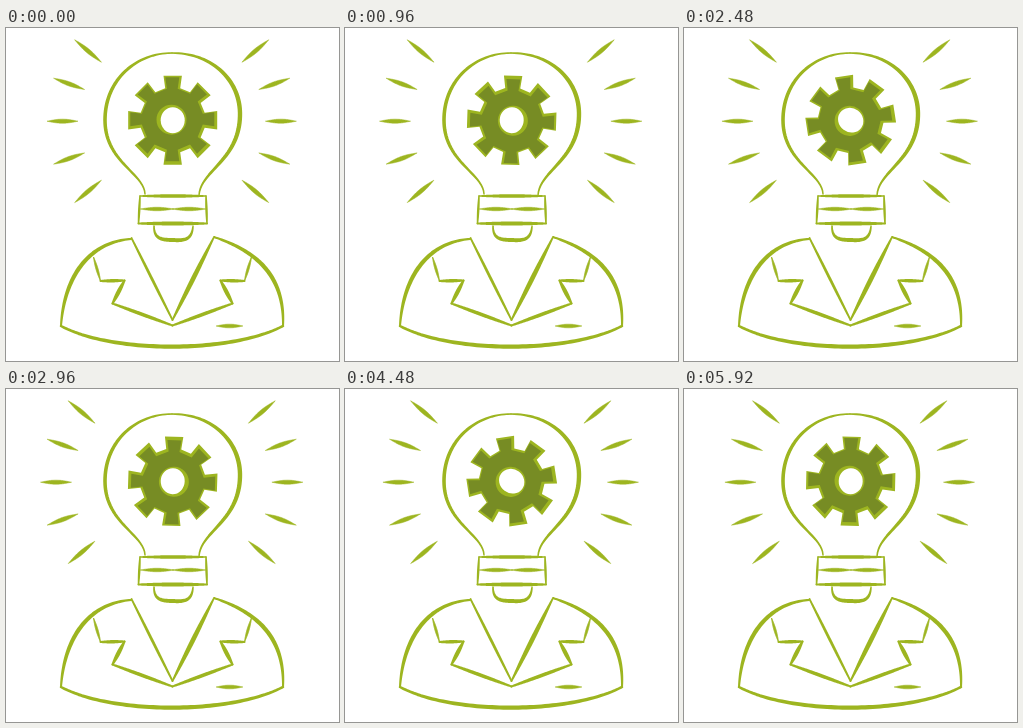
An HTML page that plays this animation: 333 px wide and 333 px high, repeating every 6000 ms.

```html
<!DOCTYPE html>
<html lang="en">
<head>
<meta charset="utf-8">
<title>Idea</title>
<style>
html, body { margin: 0; width: 100%; height: 100%; overflow: hidden; background: #fff; }
svg { display: block; width: 100%; height: 100%; }
</style>
</head>
<body>
<svg viewBox="0 0 333 333" fill="#9db520" stroke="#9db520" stroke-width="0" stroke-linejoin="round">
  <g id="left"></g>
  <g id="right"></g>
  <g id="figure"></g>
  <g id="gear">
    <path id="rim"/>
    <path id="face" fill="#778c24" transform="translate(-.4 -1)"/>
    <circle cx="-1.200" cy="-.5" r="15"/>
    <ellipse rx="12" ry="13" fill="#fff"/>
  </g>
</svg>
<script>
const $ = id => document.getElementById(id);

// Brush stroke along a path: `thin` at the ends, `thick` in the middle
function brush(d, thin, thick, parent = "figure") {
  const path = document.createElementNS("http://www.w3.org/2000/svg", "path");
  path.setAttribute("d", d);
  const length = path.getTotalLength(), steps = 60, outer = [], inner = [];
  for (let i = 0; i <= steps; i++) {
    const s = length * i / steps;
    const p = path.getPointAtLength(s);
    const a = path.getPointAtLength(Math.max(0, s - .5));
    const b = path.getPointAtLength(Math.min(length, s + .5));
    const angle = Math.atan2(b.y - a.y, b.x - a.x);
    const half = (thick - thin) / 2 * Math.sin(Math.PI * i / steps);
    const dx = -Math.sin(angle) * half, dy = Math.cos(angle) * half;
    outer.push(`${p.x + dx} ${p.y + dy}`);
    inner.unshift(`${p.x - dx} ${p.y - dy}`);
  }
  path.setAttribute("d", `M${outer.concat(inner).join("L")}Z`);
  path.setAttribute("stroke-width", thin);
  $(parent).append(path);
}

// Rays, 20 degrees apart on both sides
for (const [id, side] of [["left", -1], ["right", 1]])
  for (let i = -2; i <= 2; i++) {
    const a = i * Math.PI / 9, half = 15.5 + Math.abs(i);
    const at = r => `${165.7 + side * r * Math.cos(a)} ${93.2 + r * Math.sin(a)}`;
    brush(`M${at(109.2 - half)}L${at(109.2 + half)}`, .5, 4.6, id);
  }

// Bulb
brush("M139 166C138 145 99 134 99 92C99 52 130 25 166 25", 1.5, 3.6);
brush("M166 25C206 25 234 52 234 86C234 132 195 142 193 167", 1.5, 4.4);

// Socket
brush("M134 168H200", 1.5, 3.6);
brush("M134 168L132.500 195.500", 1.5, 2.4);
brush("M200 168L201 195.500", 1.5, 2.4);
brush("M132.500 195.500H201", 2, 4);
brush("M134 181H168", .5, 4);
brush("M166 181H200", .5, 4);
brush("M148 198C148 210 154 212 167 212C181 213 186 210 187 198", 1.5, 4);

// Jacket
brush("M55 298C58 250 82 214 125 211", 2, 4.2);
brush("M55 298C105 325 223 326 277 298", 2.5, 4.2);
brush("M277 298C279 245 247 222 208 209", 2, 4.2);
brush("M210 298H237", .5, 4.2);

// Lapels, mirrored about the middle
for (const side of [-1, 1]) {
  const line = (x1, y1, x2, y2, thin, thick) =>
    brush(`M${166.5 + side * x1} ${y1}L${166.5 + side * x2} ${y2}`, thin, thick);
  line(41, 210, 0, 292, 1.8, side < 0 ? 2.8 : 4.6);
  line(79, 229, 72, 253, 1, 3);
  line(72, 253, 48, 252.5, 2, 3.4);
  line(48, 252.5, 60, 275.5, 2, 4.2);
  line(60, 275.5, 0, 297.5, 2, 3.6);
}

function gearPath(root, tip, rootHalf, tipHalf) {
  const points = [];
  for (let i = 0; i < 8; i++) {
    const a = i * Math.PI / 4, c = Math.cos(a), s = Math.sin(a);
    for (const [r, h] of [[root, -rootHalf], [tip, -tipHalf], [tip, tipHalf], [root, rootHalf]])
      points.push(`${r * c - h * s} ${r * s + h * c}`);
  }
  return `M${points.join("L")}Z`;
}
$("rim").setAttribute("d", gearPath(32, 44.5, 7.5, 9.2));
$("face").setAttribute("d", gearPath(30.5, 42, 5.4, 7));

const smooth = p => (1 - Math.cos(Math.PI * p)) / 2;

function draw(now) {
  const t = now % 2000 / 2000;
  const shift = 6.5 * smooth(2 * t);
  const turn = -360 * smooth(t + .065 * t * (1 - t));
  $("left").setAttribute("transform", `translate(${-shift})`);
  $("right").setAttribute("transform", `translate(${shift})`);
  $("gear").setAttribute("transform", `translate(166.700 92.200) rotate(${turn})`);
  requestAnimationFrame(draw);
}
requestAnimationFrame(draw);
</script>
</body>
</html>
```
